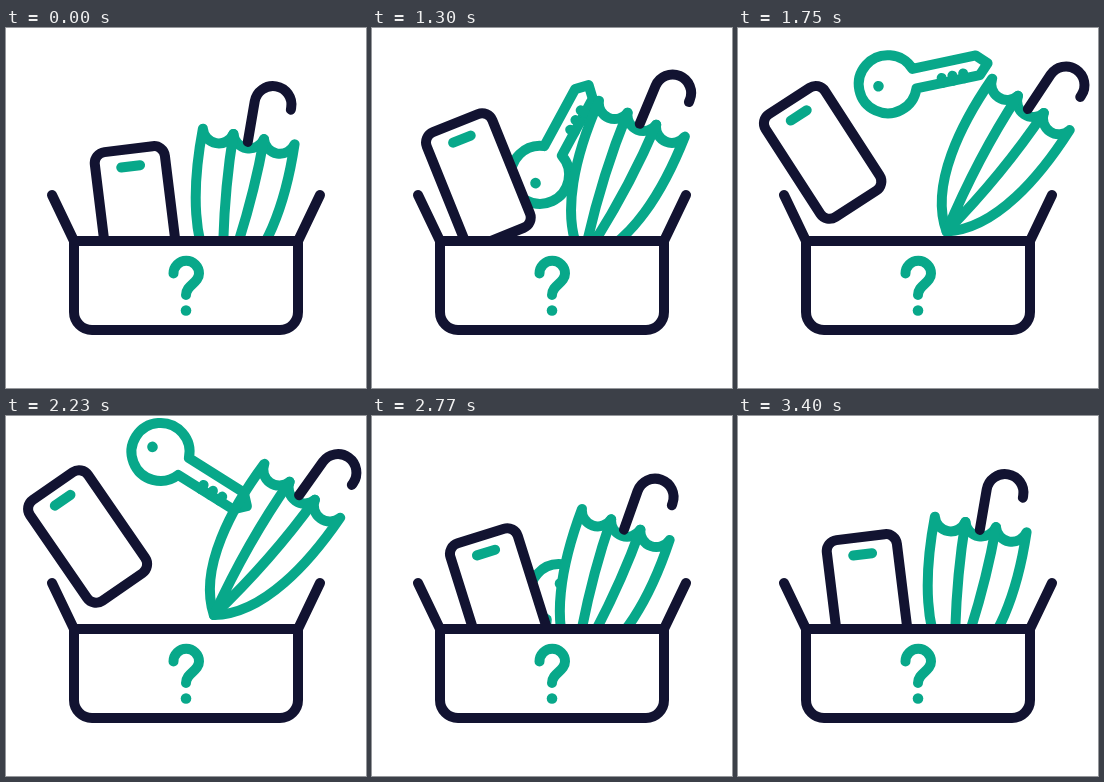
Recreate the animation shown at these times as an HTML page. Size 360 px wide and 360 px high, loop 3430 ms.

```html
<!DOCTYPE html>
<html lang="en">
<head>
<meta charset="utf-8">
<title>Lost and found</title>
<style>
  html, body { margin: 0; width: 100%; height: 100%; overflow: hidden; background: #fff; }
  svg { display: block; width: 100vw; height: 100vh; }

  .line { fill: none; stroke-width: 10; stroke-linecap: round; stroke-linejoin: round; }
  .navy { stroke: #121331; }
  .teal { stroke: #08a88a; }
  .dot { fill: #08a88a; }
  .solid { fill: #fff; }

  .item { transform-origin: 0 0; animation: 3430ms linear infinite; }
  .phone { animation-name: phone-move, phone-turn; }
  .umbrella { animation-name: umbrella-move, umbrella-turn; }
  .key { animation-name: key-move, key-turn; }
  .canopy { animation: canopy-fill 3430ms step-end infinite; }

  @keyframes phone-move {
    0%, 30.03% { translate: 130px 182px; animation-timing-function: cubic-bezier(.3, .67, .62, 1); }
    61.52% { translate: 80px 118.5px; animation-timing-function: cubic-bezier(.333, 0, .667, .333); }
    81.34%, 100% { translate: 130px 182px; }
  }
  @keyframes phone-turn {
    0%, 30.03% { rotate: -7deg; animation-timing-function: cubic-bezier(.28, .78, .6, 1); }
    61.52% { rotate: -34.7deg; animation-timing-function: cubic-bezier(.74, 0, .28, 1); }
    97.08%, 100% { rotate: -7deg; }
  }
  @keyframes umbrella-move {
    0%, 30.03% { translate: 233.2px 164.2px; animation-timing-function: cubic-bezier(.3, .68, .62, 1); }
    61.52% { translate: 264.5px 119.4px; animation-timing-function: cubic-bezier(.333, 0, .667, .333); }
    81.34%, 100% { translate: 233.2px 164.2px; }
  }
  @keyframes umbrella-turn {
    0%, 30.03% { rotate: 9.7deg; animation-timing-function: cubic-bezier(.3, .72, .6, 1); }
    61.52% { rotate: 35.6deg; animation-timing-function: cubic-bezier(.74, 0, .28, 1); }
    97.08%, 100% { rotate: 9.7deg; }
  }
  @keyframes key-move {
    0%, 29.88% { translate: 185px 279px; animation-timing-function: cubic-bezier(.24, .95, .5, 1); }
    59.77% { translate: 186px 45px; animation-timing-function: cubic-bezier(.333, 0, .667, .333); }
    84.55%, 100% { translate: 183px 280px; }
  }
  @keyframes key-turn {
    0%, 29.88% { rotate: -92deg; }
    44.02% { rotate: -38.5deg; }
    51.02% { rotate: -12deg; }
    65.01% { rotate: 32deg; }
    80.76% { rotate: 95deg; }
    84.55%, 100% { rotate: 110deg; }
  }
  /* The key tip shows through the canopy while it is in the air. */
  @keyframes canopy-fill {
    0% { fill: #fff; }
    45% { fill: transparent; }
    71.5%, 100% { fill: #fff; }
  }
</style>
</head>
<body>
<svg viewBox="0 0 360 360">
  <clipPath id="above"><path d="M0 0H360V213H0Z"/></clipPath>

  <g clip-path="url(#above)">
    <g class="item key">
      <g transform="translate(-37 0)">
        <path class="line teal" d="M27.2 -10A29 29 0 1 0 27.2 10H92L102 0L92 -10Z"/>
        <path class="line teal" d="M54 10V5M65 10V5M76 10V5"/>
        <circle class="dot" cx="-9.5" r="5.3"/>
      </g>
    </g>

    <g class="item phone">
      <rect class="line navy solid" x="-35.3" y="-61.3" width="70.6" height="122.6" rx="11"/>
      <path class="line teal" d="M-9.5 -44H9.5"/>
    </g>

    <g class="item umbrella">
      <g transform="translate(0 -58)">
        <path class="line teal canopy" d="M-46.5 1.5A16 16 0 0 0 -15.5 1.5A16 16 0 0 0 15.5 1.5A16 16 0 0 0 46.5 1.5C47.5 55 40 125 0 154C-40 125 -47.5 55 -46.5 1.5Z"/>
        <path class="line teal" d="M-15.5 1.5Q-15 75 0 154Q15 75 15.5 1.5"/>
        <path class="line navy" d="M0 7V-34A18.5 18.5 0 0 1 37 -34V-32"/>
      </g>
    </g>
  </g>

  <path class="line navy" d="M46 167L68 213H292L314 167M68 213V284A18 18 0 0 0 86 302H274A18 18 0 0 0 292 284V213"/>
  <path class="line teal" d="M167.5 245.5A12.7 12.7 0 0 1 193 245.5C193 255 180 257 180 267"/>
  <circle class="dot" cx="180" cy="282.5" r="5.3"/>
</svg>
</body>
</html>
```
